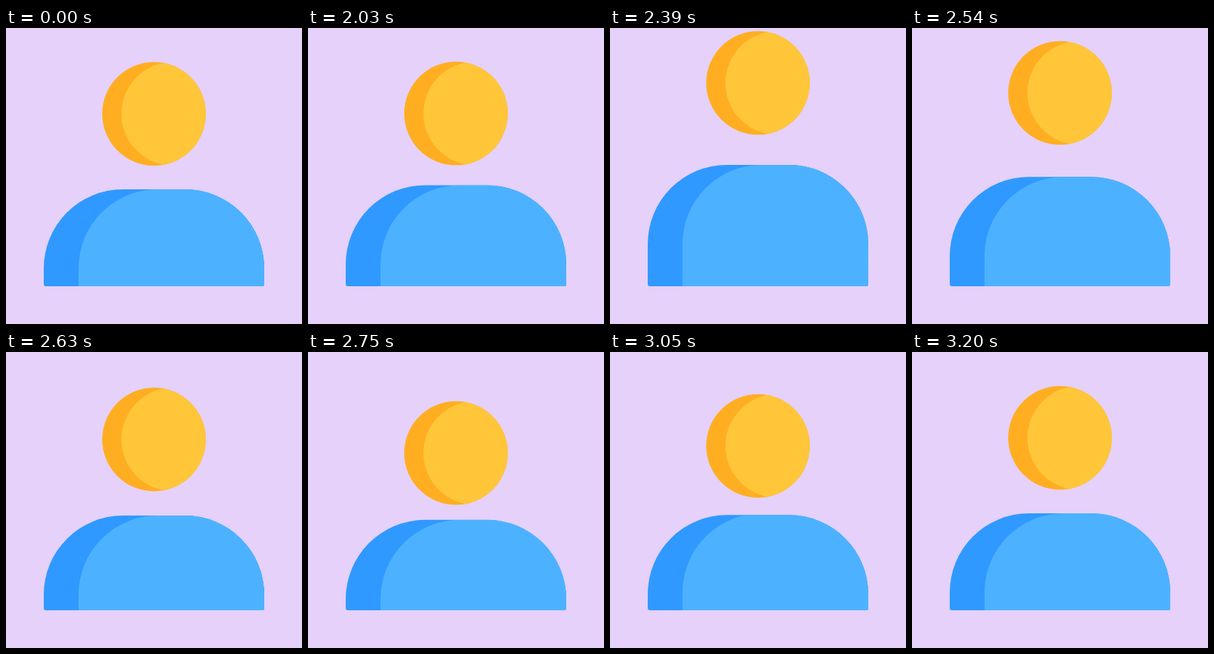
An HTML page for the animation above (3.23 s loop, 400 by 400 pixels).

```html
<!DOCTYPE html>
<html lang="en">
<head>
<meta charset="utf-8">
<title>User icon</title>
<style>
  html, body { margin: 0; height: 100%; overflow: hidden; background: #e5d1fa; }
  svg { display: block; width: 100%; height: 100%; }
</style>
</head>
<body>
<svg viewBox="0 0 400 400">
  <clipPath id="headClip"><circle cx="200" cy="116" r="70"/></clipPath>
  <clipPath id="bodyClip"><path class="outline"/></clipPath>
  <g id="head">
    <circle cx="200" cy="116" r="70" fill="#ffae22"/>
    <circle cx="226" cy="116" r="70" fill="#ffc63a" clip-path="url(#headClip)"/>
  </g>
  <path class="outline" fill="#3099ff"/>
  <g clip-path="url(#bodyClip)"><path id="light" fill="#4cb2ff"/></g>
</svg>
<script>
const LOOP = 3230, START = 2030, STEP = 30;
const head = document.getElementById('head');
const light = document.getElementById('light');
const outlines = document.querySelectorAll('.outline');

const sineOut = s => Math.sin(s * Math.PI / 2);
const quartInOut = s => s < .5 ? 8 * s ** 4 : 1 - 8 * (1 - s) ** 4;
const smooth = s => s * s * (3 - 2 * s);

// Each move is [start, end, target, ease], beginning at rest (0).
const headMoves = [[2028, 2290, -42, sineOut], [2299, 2895, 22.3, quartInOut], [2895, 3200, 0, smooth]];
const bodyMoves = [[2000, 2280, -33.5, sineOut], [2285, 2827, 9, quartInOut], [2827, 3160, 0, smooth]];
const lightMoves = [...bodyMoves.slice(0, 2), [2827, 3060, 0, smooth]];

function offsetAt(moves, t) {
  let y = 0;
  for (const [start, end, target, ease] of moves) {
    const s = Math.min(1, Math.max(0, (t - start) / (end - start)));
    y += (target - y) * ease(s);
  }
  return y;
}

function draw(now) {
  const time = now % LOOP;
  const t = time < START ? 0 : START + Math.floor((time - START) / STEP) * STEP;
  const top = 218 + offsetAt(bodyMoves, t);
  const lightTop = 218 + offsetAt(lightMoves, t);
  head.setAttribute('transform', `translate(0 ${offsetAt(headMoves, t)})`);
  for (const path of outlines) path.setAttribute('d',
    `M51 346V${top + 107}A107 107 0 0 1 158 ${top}H242A107 107 0 0 1 349 ${top + 107}V346Q349 349 346 349H54Q51 349 51 346Z`);
  light.setAttribute('d', `M98 349V${lightTop + 107}A107 107 0 0 1 205 ${lightTop}H349V349Z`);
  requestAnimationFrame(draw);
}
requestAnimationFrame(draw);
</script>
</body>
</html>
```
